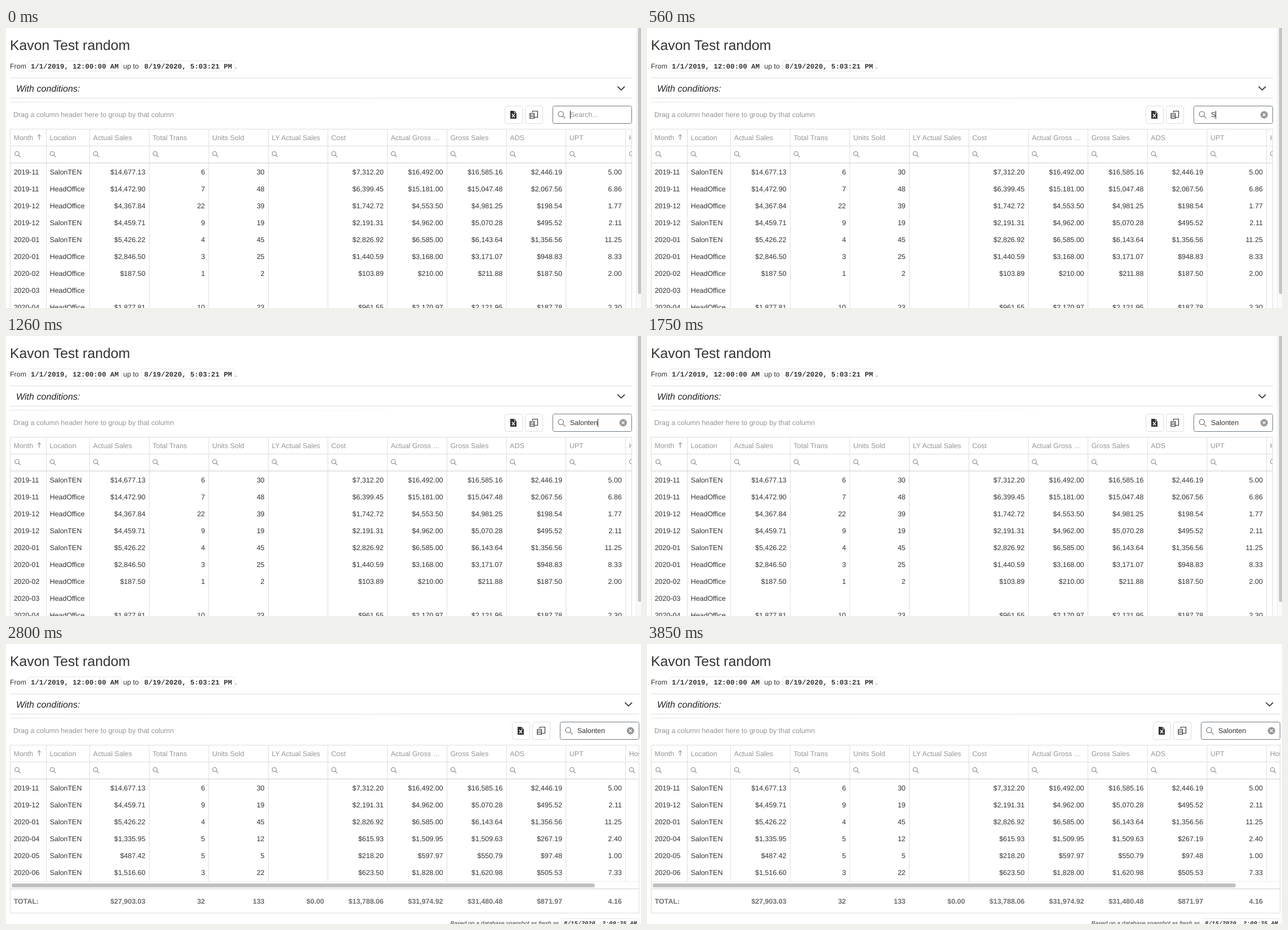
Animation, 1127 px wide and 497 px high, one loop 3.92 s. Source, as an HTML page:

```html
<!DOCTYPE html>
<html lang="en">
<head>
<meta charset="utf-8">
<title>Sales report search</title>
<style>
  html, body { margin: 0; width: 100%; height: 100%; overflow: hidden; background: #fff; }
  svg { display: block; width: 1127px; height: 497px; }
  text {
    font: 12.45px "Liberation Sans", Arial, sans-serif;
    fill: #333; white-space: pre; text-rendering: geometricPrecision;
  }
  text.title { font-size: 24.8px; }
  text.cond { font-size: 16.1px; font-style: italic; fill: #222; }
  text.code { font: bold 12.38px "Liberation Mono", monospace; }
  text.note { font-size: 10.18px; font-style: italic; }
  text.noteCode { font: italic bold 10.3px "Liberation Mono", monospace; }
  text.grey { fill: #959595; }
  text.total { font-weight: bold; fill: #707070; }
  text.end { text-anchor: end; }
  .line { fill: #ddd; }
  .box { fill: #fff; stroke: #ddd; }
  .code-box { fill: #fff; stroke: #e6e6e6; }
  .dark { fill: none; stroke: #333; }
  .lens { fill: none; stroke: #808080; stroke-width: 1.1; }
</style>
</head>
<body>
<svg id="stage" viewBox="0 0 1127 497">
  <defs>
    <linearGradient id="fade">
      <stop offset="0" stop-color="#e2e2e2"/>
      <stop offset=".14" stop-color="#ececec"/>
      <stop offset="1" stop-color="#fafafa"/>
    </linearGradient>
    <g id="lens" class="lens"><circle cx="-1" cy="-1" r="3.7"/><path d="M1.7 1.7L5.2 5.2"/></g>
  </defs>
</svg>
<script>
const stage = document.getElementById('stage');
const LOOP = 3920;
const PLACE = 'SalonTEN';
const QUERY = 'Salonten';
const HEADS = ['Month', 'Location', 'Actual Sales', 'Total Trans', 'Units Sold', 'LY Actual Sales',
  'Cost', 'Actual Gross …', 'Gross Sales', 'ADS', 'UPT', 'Hours'];
const COLS = HEADS.map((_, i) => i < 2 ? 7 + 64 * i : 148 + 105.68 * (i - 2));
const HQ = 'HeadOffice';
const ROWS = [
  `2019-11|${PLACE}|$14,677.13|6|30||$7,312.20|$16,492.00|$16,585.16|$2,446.19|5.00`,
  `2019-11|${HQ}|$14,472.90|7|48||$6,399.45|$15,181.00|$15,047.48|$2,067.56|6.86`,
  `2019-12|${HQ}|$4,367.84|22|39||$1,742.72|$4,553.50|$4,981.25|$198.54|1.77`,
  `2019-12|${PLACE}|$4,459.71|9|19||$2,191.31|$4,962.00|$5,070.28|$495.52|2.11`,
  `2020-01|${PLACE}|$5,426.22|4|45||$2,826.92|$6,585.00|$6,143.64|$1,356.56|11.25`,
  `2020-01|${HQ}|$2,846.50|3|25||$1,440.59|$3,168.00|$3,171.07|$948.83|8.33`,
  `2020-02|${HQ}|$187.50|1|2||$103.89|$210.00|$211.88|$187.50|2.00`,
  `2020-03|${HQ}`,
  `2020-04|${HQ}|$1,877.81|10|23||$961.55|$2,170.97|$2,121.95|$187.78|2.30`,
  `2020-04|${PLACE}|$1,335.95|5|12||$615.93|$1,509.95|$1,509.63|$267.19|2.40`,
  `2020-05|${PLACE}|$487.42|5|5||$218.20|$597.97|$550.79|$97.48|1.00`,
  `2020-06|${PLACE}|$1,516.60|3|22||$623.50|$1,828.00|$1,620.98|$505.53|7.33`
].map(row => row.split('|'));
const TOTALS = 'TOTAL:||$27,903.03|32|133|$0.00|$13,788.06|$31,974.92|$31,480.48|$871.97|4.16'.split('|');

// [start ms, letters typed, caret shown, list filtered]
const STEPS = [
  [0, 0, 1, 0], [560, 1, 1, 0], [630, 2, 1, 0], [770, 3, 1, 0], [910, 5, 1, 0],
  [1050, 6, 1, 0], [1190, 7, 1, 0], [1260, 8, 1, 0], [1750, 8, 0, 0],
  [2100, 8, 0, 1], [2310, 8, 1, 1], [2800, 8, 0, 1], [3290, 8, 1, 1], [3850, 8, 0, 1]
];

function add(parent, tag, attrs = {}, str) {
  const el = document.createElementNS('http://www.w3.org/2000/svg', tag);
  for (const key in attrs) el.setAttribute(key, attrs[key]);
  if (str !== undefined) el.textContent = str;
  parent.appendChild(el);
  return el;
}
const text = (p, x, y, str, cls = '') => add(p, 'text', { x, y, class: cls }, str);
const rect = (p, x, y, width, height, attrs) => add(p, 'rect', { x, y, width, height, class: 'line', ...attrs });
const box = (p, x, y, w, h, cls = 'box') => rect(p, x + .5, y + .5, w - 1, h - 1, { rx: 3, class: cls });
const path = (p, d, attrs) => add(p, 'path', { d, class: 'dark', ...attrs });
const lens = (p, x, y, k = 1) => add(p, 'use', { href: '#lens', transform: `translate(${x} ${y}) scale(${k})` });

function drawCells(p, cells, y, cls = '') {
  cells.forEach((str, i) => {
    if (!str) return;
    if (i < 2) text(p, COLS[i] + 6.7, y, str, cls);
    else text(p, COLS[i + 1] - 6.3, y, str, 'end ' + cls);
  });
}

// right: outer edge of the table, low: where the column lines stop, foot: bottom of the table
function drawTable(id, rows, right, low, foot) {
  const g = add(stage, 'g');
  add(add(g, 'clipPath', { id }), 'rect', { x: 0, y: 170, width: right - 1, height: 330 });
  const grid = add(g, 'g', { 'clip-path': `url(#${id})` });
  rect(g, 7, 88, right - 7, 1);
  rect(g, 7, 124, right - 7, 1);
  rect(g, 7, 179, right - 7, 1);
  rect(g, 7, 209, right - 7, 1);
  rect(g, 7, 238.8, right - 7, 1.6);
  rect(g, 7, 179, 1, foot - 179);
  rect(g, right - 1, 179, 1, foot - 179);
  COLS.forEach((x, i) => {
    if (i) rect(grid, x, 179, 1, low - 179);
    text(grid, x + 6.6, 198.5, HEADS[i], 'grey');
    lens(grid, x + (i ? 12 : 13.5), 224);
  });
  path(grid, 'M59 198.5V189.5M56 192.5L59 189.3L62 192.5', { style: 'stroke:#777' });
  rows.forEach((row, i) => drawCells(grid, row, 260 + i * 30));
  return g;
}

function drawHeading() {
  text(stage, 7, 39, 'Kavon Test random', 'title');
  text(stage, 7, 71.5, 'From');
  box(stage, 39, 58, 166, 19, 'code-box');
  text(stage, 44, 72, '1/1/2019, 12:00:00 AM', 'code');
  text(stage, 208, 71.5, 'up to');
  box(stage, 240, 58, 166, 19, 'code-box');
  text(stage, 245.3, 72, '8/19/2020, 5:03:21 PM', 'code');
  text(stage, 406.3, 71.5, '.');
  text(stage, 18, 112.7, 'With conditions:', 'cond');
  rect(stage, 7, 131, 684, 1, { style: 'fill:url(#fade)' });
  text(stage, 13, 158, 'Drag a column header here to group by that column', 'grey');
}

function drawFull() {
  const g = drawTable('fullClip', ROWS, 1111, 497, 497);
  rect(g, 1118, 0, 9, 497, { style: 'fill:#fafafa' });
  rect(g, 1118, 0, 1, 497, { style: 'fill:#ececec' });
  rect(g, 1121.5, -8, 7, 480, { rx: 3.5, style: 'fill:#c4c4c4' });
  return g;
}

function drawFiltered() {
  const g = drawTable('shortClip', ROWS.filter(row => row[1] === PLACE), 1124, 421, 478);
  rect(g, 8, 421, 1115, 1, { style: 'fill:#ececec' });
  rect(g, 10, 425, 1035, 7, { rx: 3.5, style: 'fill:#c1c1c1' });
  rect(g, 7, 433.8, 1117, 1.6);
  drawCells(g, TOTALS, 461, 'total');
  rect(g, 7, 477, 1117, 1);
  text(g, 788.5, 499, 'Based on a database snapshot as fresh as', 'note');
  box(g, 985, 487, 139, 18, 'code-box');
  text(g, 990, 499.3, '8/15/2020, 2:09:35 AM', 'noteCode');
  return g;
}

function drawTools() {
  const g = add(stage, 'g');
  path(g, 'M1085.5 103.8L1091.8 110.1L1098.1 103.8', { 'stroke-width': 1.8 });
  box(g, 885, 138, 32, 32);
  box(g, 921, 138, 32, 32);
  path(g, 'M895 147H902.5L906 150.5V161H895Z', { style: 'fill:#333;stroke:none' });
  path(g, 'M902.3 147V150.7H906', { style: 'stroke:#fff;stroke-width:.8' });
  path(g, 'M898 152.5L903 158.5M903 152.5L898 158.5', { style: 'stroke:#fff;stroke-width:1.4' });
  path(g, 'M934.5 150V147.5H943.5V158.5H937.5M930 151.5H937.5V160.5H930ZM930 154.5H937.5M930 157.5H937.5',
    { 'stroke-width': 1.2 });
  rect(g, 970.5, 138.5, 140, 31, { rx: 3, style: 'fill:#fff;stroke:#6c7a83' });
  lens(g, 986, 154, 1.25);
  return g;
}

drawHeading();
const full = drawFull();
const filtered = drawFiltered();
const tools = drawTools();
const field = text(tools, 1001, 158.3, '');
const caret = rect(tools, 1001, 147, 1, 14, { style: 'fill:#222' });
const clear = add(tools, 'g');
add(clear, 'circle', { cx: 1095.3, cy: 154, r: 6.5, fill: '#959595' });
path(clear, 'M1092.8 151.5L1097.8 156.5M1097.8 151.5L1092.8 156.5', { style: 'stroke:#fff;stroke-width:1.4' });

const show = (el, on) => el.setAttribute('visibility', on ? 'visible' : 'hidden');
const begin = performance.now();
let last;

function frame(now) {
  const t = Math.max(0, now - begin) % LOOP;
  const step = STEPS.findLast(s => s[0] <= t);
  if (step !== last) {
    last = step;
    const [, typed, blink, short] = step;
    field.textContent = typed ? QUERY.slice(0, typed) : 'Search...';
    field.setAttribute('class', typed ? '' : 'grey');
    caret.setAttribute('x', 1001 + (typed ? Math.round(field.getComputedTextLength()) : 0));
    show(caret, blink);
    show(clear, typed);
    show(full, !short);
    show(filtered, short);
    tools.setAttribute('transform', `translate(${short ? 13 : 0} 0)`);
  }
  requestAnimationFrame(frame);
}
frame(begin);
</script>
</body>
</html>
```
